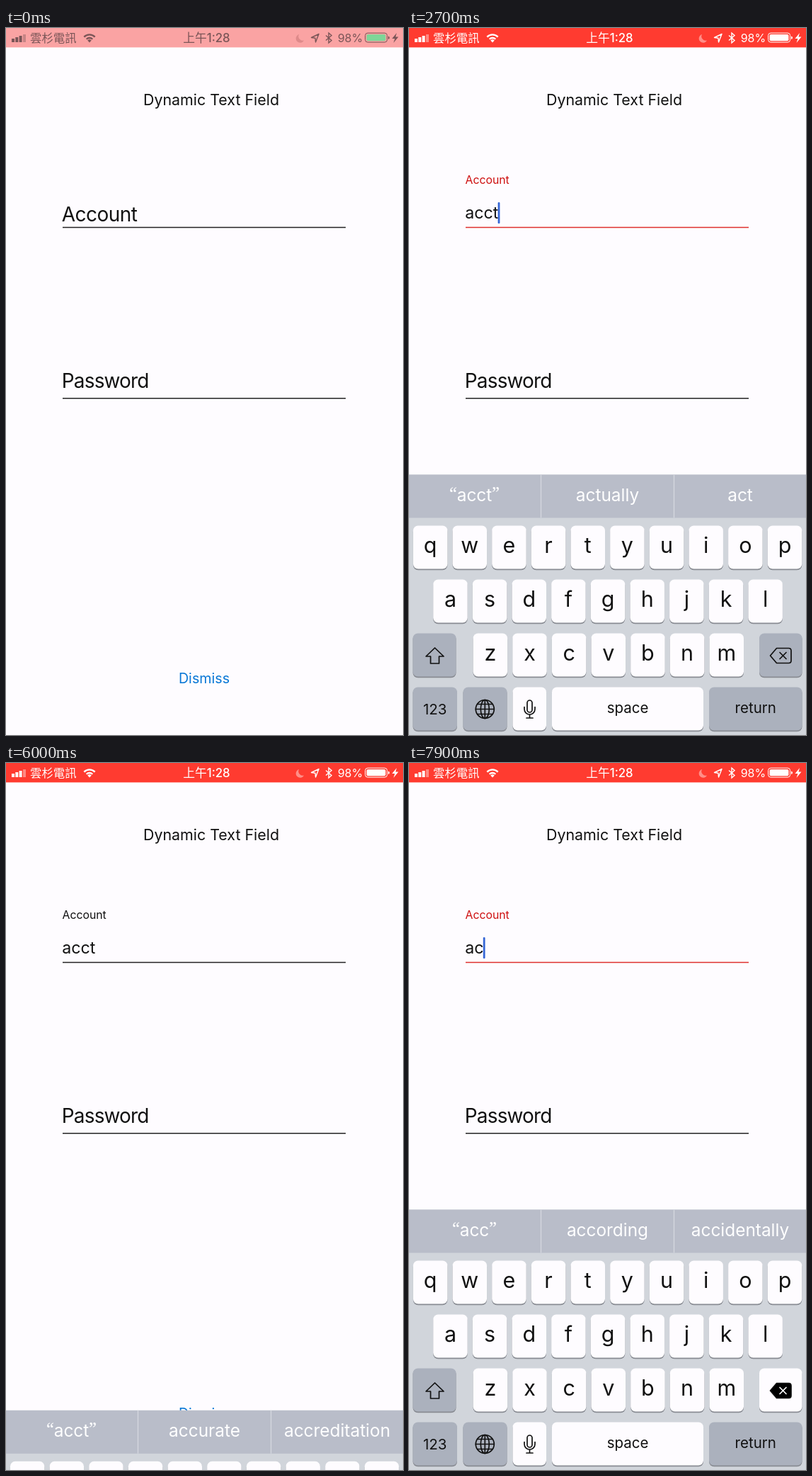
An HTML page that plays this animation: 561 by 998 pixels, repeating every 8000 ms.

```html
<!DOCTYPE html>
<html lang="en">
<head>
<meta charset="utf-8">
<title>Dynamic Text Field</title>
<style>
  html, body { margin: 0; width: 100%; height: 100%; overflow: hidden; background: #fefcff; }
  svg { display: block; width: 561px; height: 998px; font-family: Inter, "Noto Sans CJK TC", "Noto Sans CJK", sans-serif; fill: #111; }
  .mid { text-anchor: middle; }
  .line { fill: none; stroke: #111; stroke-width: 1.7; stroke-linejoin: round; stroke-linecap: round; }
  .ink { fill: currentColor; }
  .pen { fill: none; stroke: currentColor; }
  .letter { font-size: 30.5px; text-anchor: middle; }
  .hint { font-size: 24.4px; fill: #fff; text-anchor: middle; }
  .quote { font-family: "Noto Serif", serif; baseline-shift: 3px; }
  #popup { filter: drop-shadow(0 1px 4px #0005); }
</style>
</head>
<body>
<svg viewBox="0 0 561 998">
  <rect width="561" height="998" fill="#fefcff"/>
  <text class="mid" x="290" y="109" font-size="21.4">Dynamic Text Field</text>
  <path id="rule" d="M80 281.5H480" stroke-width="1.5"/>
  <text id="label">Account</text>
  <text id="value" x="79.2" y="269.2" font-size="23.2"></text>
  <rect id="caret" y="246" width="2.8" height="30" rx="1" fill="#3566d6"/>
  <path d="M80 522.8H480" stroke="#222" stroke-width="1.5"/>
  <text x="78.8" y="507.7" font-size="28" letter-spacing="-.85">Password</text>
  <text class="mid" x="280" y="925" font-size="19.7" fill="#0a78d6">Dismiss</text>

  <rect id="bar" width="561" height="27.4"/>
  <g id="status">
    <path class="ink" d="M8 15h4v5h-4zM13.3 13h4v7h-4zM18.6 11h4v9h-4z"/>
    <path class="ink" opacity=".4" d="M24 9h4v11h-4z"/>
    <text class="ink" x="34" y="20" font-size="16.4" font-weight="300">雲杉電訊</text>
    <path class="ink" d="M118 20.5l-2.8-3a4 4 0 0 1 5.6 0z"/>
    <path class="pen" stroke-width="2.3" d="M113.7 15.8A6 6 0 0 1 122.3 15.8M110.3 12.6A10.6 10.6 0 0 1 125.7 12.6"/>
    <text class="ink mid" x="283.4" y="20" font-size="16.8" font-weight="500">上午1:28</text>
    <path id="moon" d="M414 9a6 6 0 1 0 7 8.5a6 6 0 0 1-7-8.5z"/>
    <path class="pen" stroke-width="1.4" stroke-linejoin="round" d="M442 8.5l-10.5 5 5.5.7.5 5.8z"/>
    <path class="pen" stroke-width="1.4" d="M452 10.5l8 7-4 3.5V7l4 3.5-8 7"/>
    <text class="ink" x="468.7" y="20" font-size="16">98%</text>
    <rect class="pen" x="507.6" y="7.1" width="31" height="13" rx="3.5"/>
    <rect id="charge" x="509.5" y="9" width="27" height="9.2" rx="2"/>
    <path class="ink" d="M540 11.5q2 .4 2 2.2t-2 2.2zM552 7l-6.5 8h4l-2 6 7-8.5h-4z"/>
  </g>

  <g id="board">
    <rect width="561" height="400" fill="#d1d5db"/>
    <rect width="561" height="61" fill="#b9bdc9"/>
    <path d="M186.5 0V61M374.5 0V61" stroke="#d5d8df" stroke-width="1.3"/>
    <text class="hint" x="92.5" y="37.5"></text>
    <text class="hint" x="280.5" y="37.5"></text>
    <text class="hint" x="468" y="37.5"></text>
    <g id="keys"></g>
    <path class="line" d="M36.5 244.5l-12.5 12h6.5v10h12v-10h6.5z"/>
    <path id="erase" class="line" d="M510.5 255.5l9-10.5h17q3.5 0 3.5 3.5v14q0 3.5-3.5 3.5h-17z"/>
    <path id="cross" class="line" d="M524 251l9 9m0-9l-9 9"/>
    <g class="line" transform="translate(107.3 331)">
      <circle r="13"/><ellipse rx="6" ry="13"/>
      <path d="M-13 0H13M0-13V13M-10.5-7H10.5M-10.5 7H10.5"/>
    </g>
    <g class="line">
      <rect x="167" y="318.5" width="7" height="17" rx="3.5"/>
      <path d="M163 328v3a7.5 7.5 0 0 0 15 0v-3M170.5 338.5v5M166 343.5h9"/>
    </g>
    <g id="popup">
      <path fill="#fefcff" d="M-5.5-84h59q12 0 12 12v53c0 14-17 9-17 25v48.5q0 7-7 7h-34.5q-7 0-7-7v-48.5c0-16-17.5-11-17.5-25v-53q0-12 12-12z"/>
      <text class="mid" x="24" y="-28" font-size="49"></text>
    </g>
  </g>
</svg>
<script>
const LOOP = 8000, TOP = 630.5, HEIGHT = 367.5, WIDE = 48.5, PITCH = 55.65;
const $ = id => document.getElementById(id);
const set = (el, attrs) => { for (const k in attrs) el.setAttribute(k, attrs[k]); };
const clamp = x => Math.min(1, Math.max(0, x));
const lerp = (a, b, p) => a + (b - a) * p;
const mix = (a, b, p) => `rgb(${a.map((v, i) => Math.round(lerp(v, b[i], p)))})`;
const last = (list, t) => list.filter(e => e[0] <= t).pop();

// Focus changes, key strokes ("<" erases) and suggestion updates, by time
const FOCUS = [[607, 1], [5847, 0], [6640, 1]];
const STROKES = [
  [1700, "a"], [1900, "c"], [2100, "c"], [2350, "t"],
  [3500, "<"], [3700, "<"], [3900, "<"], [4100, "<"],
  [4580, "a"], [4770, "c"], [4940, "c"], [5250, "t"],
  [7600, "<"], [7860, "<"]
];
const START = ["did", "I", "app"], A = ["“a”", "app", "and"],
  AC = ["“ac”", "act", "actually"], ACC = ["“acc”", "according", "accidentally"];
const HINTS = [
  [0, START], [1850, A], [2050, AC], [2250, ACC], [2500, ["“acct”", "actually", "act"]],
  [3650, ACC], [3850, AC], [4050, A], [4250, START], [4720, A], [5080, ACC],
  [5400, ["“acct”", "accurate", "accreditation"]],
  [6400, ["accurate", "accreditation", ""]], [7750, ACC]
];

const spots = {};
let html = "";
function addKey(x, y, w, text = "", dark = false, style = 'class="mid" font-size="20.5"', base = 36) {
  html += `<rect x="${x}" y="${y + 1.7}" width="${w}" height="61" rx="7" fill="#898c93"/>
    <rect ${x > 490 && y === 224 ? 'id="back"' : ""} x="${x}" y="${y}" width="${w}" height="61" rx="7" fill="${dark ? "#abb1bd" : "#fefcff"}"/>
    <text ${style} x="${x + w / 2}" y="${y + base}">${text}</text>`;
}
[["qwertyuiop", 5.9], ["asdfghjkl", 34.2], ["zxcvbnm", 90.6]].forEach(([row, left], r) =>
  [...row].forEach((c, i) => {
    const x = left + i * PITCH, y = 72 + r * 76;
    spots[c] = [x, y];
    addKey(x, y, WIDE, c, false, 'class="letter"', 38.5);
  }));
addKey(5.5, 224, 61, "", true);
addKey(495, 224, 60.5, "", true);
addKey(5.5, 300, 62.5, "123", true, undefined, 38);
addKey(76.5, 300, 62, "", true);
addKey(146.5, 300, 47.5);
addKey(202, 300, 214, "space");
addKey(424, 300, 131.5, "return", true);
$("keys").innerHTML = html;
const hints = document.querySelectorAll(".hint");
const popupText = $("popup").querySelector("text");

// Critically damped spring from 0 to 1
const spring = ms => { const w = Math.max(0, ms) * 0.01826; return 1 - (1 + w) * Math.exp(-w); };

function drawStatus(t) {
  const p = clamp(t / 330);
  $("bar").setAttribute("fill", mix([250, 163, 163], [255, 59, 48], p));
  $("status").style.color = mix([122, 84, 86], [255, 255, 255], p);
  $("moon").setAttribute("fill", mix([222, 138, 138], [255, 142, 135], p));
  $("charge").setAttribute("fill", mix([126, 214, 152], [255, 255, 255], p));
}

function drawField(t, focus, stroke) {
  const age = focus ? t - focus[0] : 0, on = focus && focus[1];
  const red = focus ? (on ? clamp(age / 150) : 1 - clamp(age / 130)) : 0;
  const q = clamp((t - FOCUS[0][0]) / 260), up = q * q * (3 - 2 * q);
  set($("label"), {
    x: lerp(78.8, 79.5, up), y: lerp(272.6, 220, up), "font-size": lerp(28, 15.8, up),
    "letter-spacing": lerp(-0.55, 0, up), fill: mix([17, 17, 17], [206, 16, 16], red)
  });
  $("rule").setAttribute("stroke", mix([34, 34, 34], [222, 48, 46], red));

  const text = STROKES.filter(s => s[0] <= t)
    .reduce((s, [, c]) => c === "<" ? s.slice(0, -1) : s + c, "");
  $("value").textContent = text;
  const width = text ? $("value").getComputedTextLength() : 0;
  const beat = (t - Math.max(focus ? focus[0] : 0, stroke ? stroke[0] : 0)) % 1000;
  const glow = beat < 800 ? 1 - clamp((beat - 500) / 150) : clamp((beat - 850) / 150);
  set($("caret"), { x: 79.8 + width - (text ? 1.3 : 0), opacity: on ? glow : 0 });
}

function drawBoard(t, focus, stroke) {
  const s = focus ? spring(t - focus[0]) : 0;
  const shown = focus && focus[1] ? s : 1 - s;
  const y = focus ? TOP + HEIGHT * (1 - shown) : 1020;
  $("board").setAttribute("transform", `translate(0 ${y})`);
  last(HINTS, t)[1].forEach((w, i) =>
    hints[i].innerHTML = w.replace(/[“”]/g, '<tspan class="quote">$&</tspan>'));

  const key = stroke && t - stroke[0] < 110 ? stroke[1] : "";
  const spot = spots[key], erase = key === "<";
  $("popup").setAttribute("visibility", spot ? "visible" : "hidden");
  if (spot) {
    $("popup").setAttribute("transform", `translate(${spot})`);
    popupText.textContent = key;
  }
  $("back").setAttribute("fill", erase ? "#fefcff" : "#abb1bd");
  $("erase").style.fill = erase ? "#000" : "none";
  $("cross").style.stroke = erase ? "#fff" : "#111";
}

function frame() {
  const t = performance.now() % LOOP;
  const focus = last(FOCUS, t), stroke = last(STROKES, t);
  drawStatus(t);
  drawField(t, focus, stroke);
  drawBoard(t, focus, stroke);
  requestAnimationFrame(frame);
}
frame();
</script>
</body>
</html>
```
